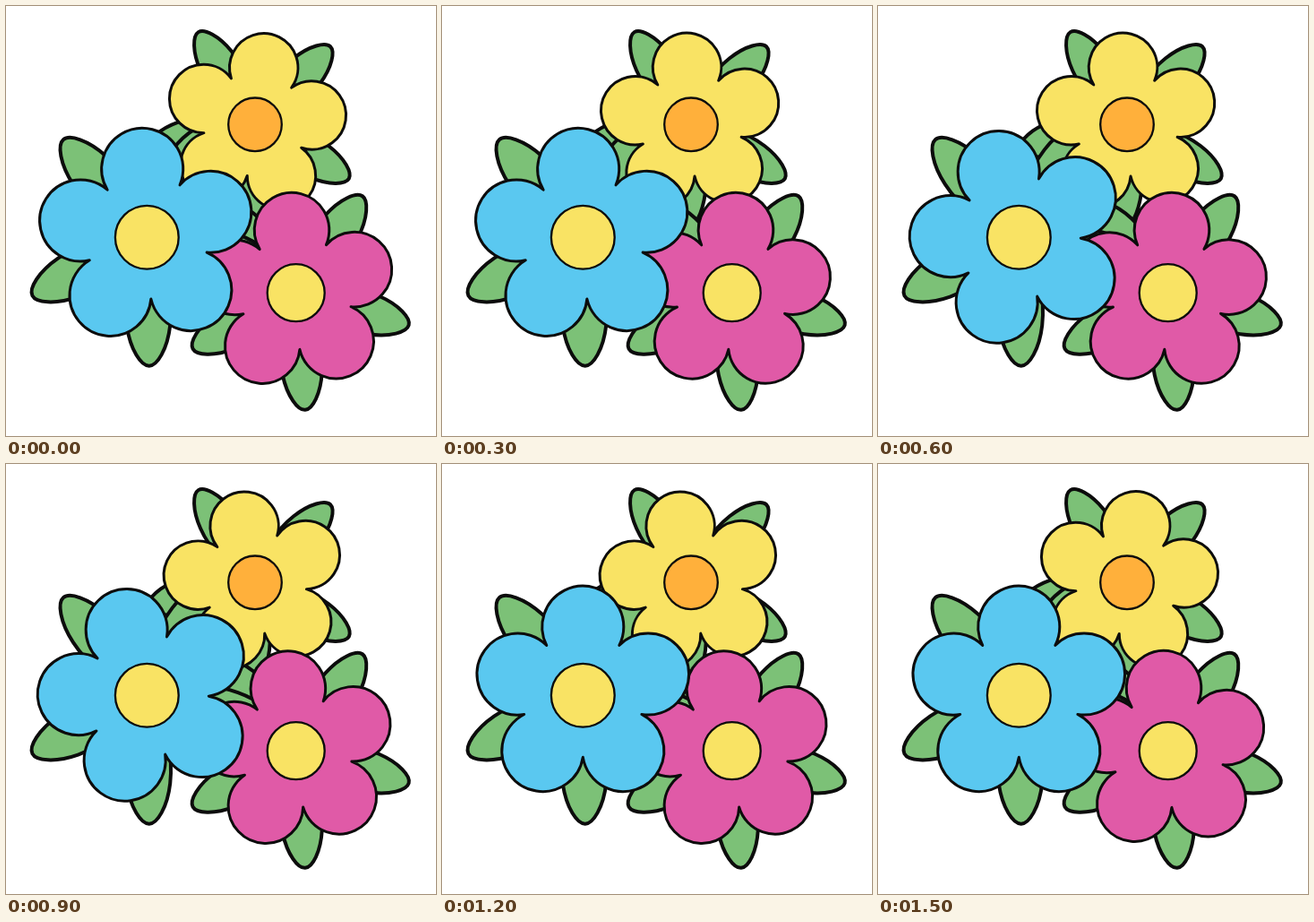
An HTML page with a canvas that plays this animation: 480x480 px, repeating every 1800 ms.

```html
<!DOCTYPE html>
<html lang="en">
<head>
<meta charset="utf-8">
<title>Three flowers</title>
<style>
html, body { margin: 0; width: 100%; height: 100%; overflow: hidden; background: #fff; }
canvas { display: block; }
</style>
</head>
<body>
<canvas id="stage" width="480" height="480"></canvas>
<script>
const ctx = document.getElementById('stage').getContext('2d');
const LOOP = 1800, HOLD = 600, FIFTH = Math.PI * 2 / 5;
const INK = '#0c0c0c', GREEN = '#7cc177', YELLOW = '#f9e364';

// Back to front. A flower's size sets its petals; poses are the angles it hops through.
const flowers = [
  { x: 278, y: 132.3, size: 64.2, eye: 29.8, fill: YELLOW, eyeFill: '#ffb03b',
    start: 300, poses: [-94, -100.7, -81.3], leafSize: 121, leaves: [238.5, 314, 30, 94, 168] },
  { x: 323.7, y: 320.2, size: 70.2, eye: 32, fill: '#e05aa7', eyeFill: YELLOW,
    start: 100, poses: [-86.5, -97.2, -93.8], leafSize: 131, leaves: [-55.5, 16, 85.5, 151.5, 230] },
  { x: 157.3, y: 258.2, size: 76.5, eye: 35.4, fill: '#5ac8f0', eyeFill: YELLOW,
    start: 0, poses: [-93.8, -107.2, -90], leafSize: 143.5, leaves: [229.5, 153, 89, 300, 12] }
];

const radians = degrees => degrees * Math.PI / 180;

function paint(fill, width) {
  ctx.fillStyle = fill;
  ctx.fill();
  ctx.lineWidth = width;
  ctx.stroke();
}

// A teardrop growing from the flower's middle
function drawLeaf(f, angle) {
  const len = f.leafSize, belly = len * 0.325, tip = len * 0.125;
  ctx.save();
  ctx.translate(f.x, f.y);
  ctx.rotate(radians(angle));
  ctx.beginPath();
  ctx.moveTo(0, 0);
  ctx.bezierCurveTo(len / 2, -belly, len, -tip, len, 0);
  ctx.bezierCurveTo(len, tip, len / 2, belly, 0, 0);
  paint(GREEN, 4);
  ctx.restore();
}

function drawFlower(f, time) {
  const pose = Math.floor((time - f.start + LOOP) % LOOP / HOLD);
  const turn = radians(f.poses[pose]);
  const half = FIFTH / 2;
  const petal = f.size * 0.595;
  const side = f.size * Math.sin(half);
  // Where neighbouring petals meet, and how far each petal's arc runs to get there
  const valley = f.size * Math.cos(half) + Math.sqrt(petal ** 2 - side ** 2);
  const sweep = Math.atan2(valley * Math.sin(half), valley * Math.cos(half) - f.size);

  ctx.beginPath();
  for (let i = 0; i < 5; i++) {
    const a = turn + i * FIFTH;
    ctx.arc(f.x + f.size * Math.cos(a), f.y + f.size * Math.sin(a), petal, a - sweep, a + sweep);
  }
  ctx.closePath();
  paint(f.fill, 3);

  ctx.beginPath();
  ctx.arc(f.x, f.y, f.eye, 0, Math.PI * 2);
  paint(f.eyeFill, 2.3);
}

function frame() {
  const time = performance.now() % LOOP;
  ctx.fillStyle = '#fff';
  ctx.fillRect(0, 0, 480, 480);
  ctx.strokeStyle = INK;
  ctx.lineJoin = 'round';
  flowers.forEach(f => f.leaves.forEach(angle => drawLeaf(f, angle)));
  flowers.forEach(f => drawFlower(f, time));
  requestAnimationFrame(frame);
}
frame();
</script>
</body>
</html>
```
